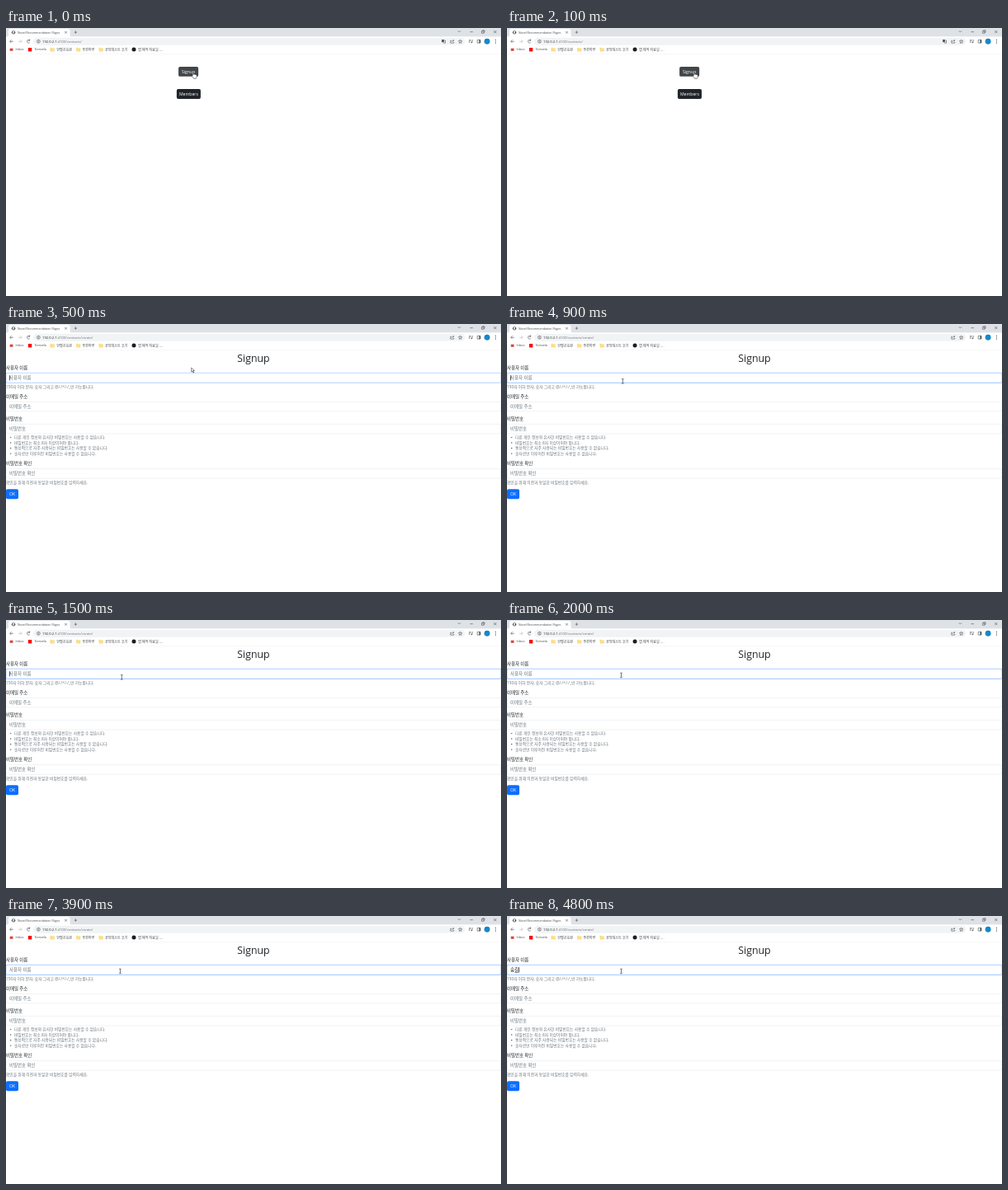
Animation of 600x325 px, one loop 5000 ms. Source, as an HTML page:

```html
<!DOCTYPE html>
<html lang="ko">
<head>
<meta charset="utf-8">
<title>Signup</title>
<style>
  html, body { margin: 0; width: 100%; height: 100%; overflow: hidden; background: #fff; }
  svg { display: block; width: 100vw; height: 100vh; }
  text { font-family: "Open Sans", "Noto Sans CJK KR", "Noto Sans CJK", sans-serif; fill: #212529; white-space: pre; }
  .line { fill: none; stroke: #505357; stroke-width: 2; }
  .faded { stroke: #b4b7ba; }
</style>
</head>
<body>
<svg id="stage" viewBox="0 0 1920 1040"></svg>
<script>
const LOOP = 5000;
const INK = '#212529', MUTED = '#6c757d', BORDER = '#ced4da';

// y is the vertical middle of the line
const text = (x, y, size, content, fill = INK, extra = '') =>
  `<text x="${x}" y="${y + size * 0.36}" font-size="${size}" style="fill:${fill}" ${extra}>${content}</text>`;
const rect = (x, y, w, h, fill, rx = 0, extra = '') =>
  `<rect x="${x}" y="${y}" width="${w}" height="${h}" rx="${rx}" fill="${fill}" ${extra}/>`;
const circle = (x, y, r, fill) => `<circle cx="${x}" cy="${y}" r="${r}" fill="${fill}"/>`;
const line = (d, cls = '') => `<path class="line ${cls}" d="${d}"/>`;
const centred = 'text-anchor="middle"';

const label = (y, content) => text(0, y, 17.4, content);
const help = (y, content) => text(0, y, 15.2, content, MUTED);
const bullet = (y, content) => circle(18, y, 2.6, MUTED) + text(32, y, 15.2, content, MUTED);
const button = (x, y, w, content, fill) =>
  rect(x, y, w, 38, fill, 6) + text(x + w / 2, y + 19, 16.5, content, '#fff', centred);
const input = (y, hint, id = '') =>
  rect(0.5, y + 0.5, 1919, 37, '#fff', 6, `stroke="${BORDER}" ${id && `id="${id}"`}`) +
  text(13, y + 19, 17.4, hint, MUTED, id && `id="${id}Hint"`);

const folder = x =>
  `<path d="M${x - 7} 77h5l2 2h8v11h-15z" fill="#ffe08a" stroke="#e9c55c"/>`;
const bookmark = (x, content, size = 13.2) => text(x, 83.5, size, content, '#45484c');

function browser() {
  return rect(0, 0, 1920, 34, '#dee1e6') +
    `<path d="M2 34q8 0 8-8V11q0-8 8-8h222q8 0 8 8v15q0 8 8 8z" fill="#fff"/>` +
    circle(29, 17, 7, '#505357') +
    `<path d="M25 14l5-2 3 4-4 2 2 3-3 2z" fill="#fff"/>` +
    text(45, 17, 11.6, 'Novel Recommendation Pages', '#45484c') +
    line('M228 13l8 8m0-8l-8 8') + line('M270 11v11m-5.5-5.5h11') +
    line('M1753 11l5 5 5-5M1800 15h11M1845 12h8v8h-8zM1848 12v-3h8v8h-3M1892 10l10 10m0-10l-10 10') +

    rect(0, 34, 1920, 68, '#fff') +
    rect(106, 38, 1674, 28, '#f1f3f4', 14) +
    line('M28 52H15m6-6l-6 6 6 6') +
    line('M48 52h13m-6-6l6 6-6 6', 'faded') +
    line('M92 48a6 6 0 1 0 0 8M92 43v6h-6') +
    `<circle class="line" cx="126" cy="52" r="6"/>` + line('M126 51v5M126 47.5v2') +
    `<text x="141" y="57" font-size="13.4" style="fill:${MUTED}"><tspan fill="${INK}">192.0.2.1</tspan>:4100/contacts/<tspan id="route">create/</tspan></text>` +
    `<g id="translate">${rect(1690, 45, 9, 10, '#505357', 1)}${line('M1696 58h8v-10h-4')}</g>` +
    line('M1728 49h-4v9h13v-4M1730 54q0-6 7-6m-3-3l3 3-3 3') +
    line('M1762 45l2 5 5 .5-4 3.5 1 5-4-3-4 3 1-5-4-3.5 5-.5z') +
    line('M1795 47h9m-9 4h7m-7 4h5M1808 56v-9h3') + circle(1806, 56, 2.5, '#505357') +
    line('M1828 46h12v12h-12z') + rect(1835, 46, 5, 12, '#505357') +
    circle(1866, 52, 11, '#1687c8') +
    [46, 52, 58].map(y => circle(1899, y, 1.8, '#505357')).join('') +

    rect(15, 79, 12, 10, '#d9483b') + bookmark(37, 'Inbox', 12) +
    rect(86, 77, 14, 14, '#f00') + bookmark(110, 'Tomvela', 12) +
    folder(179) + bookmark(196, '한별교육원') +
    folder(280) + bookmark(296, '푸른마루') +
    folder(368) + bookmark(384, '코딩테스트 후기') +
    circle(496, 83.5, 8, '#1b1f23') + bookmark(512, '앱 제작 자료실 -...') +
    rect(0, 101, 1920, 1, '#e3e5e8');
}

const home = () =>
  button(669, 150, 77, 'Signup', '#424649') + button(662, 237, 93, 'Members', INK);

function form() {
  return text(960, 132, 39.5, 'Signup', INK, centred) +
    label(170.5, '사용자 이름') +
    rect(-2, 188, 1924, 42, '#0d6efd', 8, 'id="ring"') +
    input(190, '사용자 이름', 'user') +
    text(13, 209, 17.4, '', INK, 'id="typed"') +
    rect(0, 218, 15, 1.5, INK, 0, 'id="underline"') +
    rect(0, 199, 2, 20, '#000', 0, 'id="caret"') +
    help(243, '150자 이하 문자, 숫자 그리고 @/./+/-/_만 가능합니다.') +
    label(281.5, '이메일 주소') + input(301, '이메일 주소') +
    label(368.5, '비밀번호') + input(388, '비밀번호') +
    bullet(440, '다른 개인 정보와 유사한 비밀번호는 사용할 수 없습니다.') +
    bullet(461, '비밀번호는 최소 8자 이상이어야 합니다.') +
    bullet(482, '통상적으로 자주 사용되는 비밀번호는 사용할 수 없습니다.') +
    bullet(503, '숫자로만 이루어진 비밀번호는 사용할 수 없습니다.') +
    label(542, '비밀번호 확인') + input(561.5, '비밀번호 확인') +
    help(614, '확인을 위해 이전과 동일한 비밀번호를 입력하세요.') +
    button(0, 641, 48, 'OK', '#0d6efd');
}

// pointer shapes, each with its hot spot at 0,0
const pointers = `
  <path id="hand" fill="#fff" stroke="#000" stroke-width="1.5"
    d="M-2 1q2-3 4 0v8q2-2 4 0 2-1 4 1 3-1 4 2v6q0 4-3 7h-9l-7-10q0-3 3-2z"/>
  <path id="arrow" fill="#fff" stroke="#000" stroke-width="1.5" d="M0 0v16l4-4 3 7 3-1-3-7h5z"/>
  <path id="beam" fill="none" stroke="#222" stroke-width="2" d="M-4-9h3l1 1 1-1h3M0-8v16M-4 9h3l1-1 1 1h3"/>`;

const stage = document.getElementById('stage');
stage.innerHTML = browser() +
  `<g id="home">${home()}</g><g id="form">${form()}</g>` + pointers;

const part = {};
stage.querySelectorAll('[id]').forEach(el => part[el.id] = el);
const show = (el, on) => el.style.display = on ? '' : 'none';

// [start ms, value...]
const pointerSteps = [
  [0, 'hand', 726, 171], [400, 'arrow', 719, 170], [800, 'arrow', 560, 200],
  [900, 'beam', 449, 222], [1900, 'beam', 446, 218], [2000, 'beam', 443, 214]
];
const ringSteps = [[0, 0], [500, 0.65], [600, 1]];
const caretSteps = [
  [0, false], [400, true], [1000, false], [1500, true], [2000, false],
  [2500, true], [3100, false], [3200, true], [3900, false], [4200, true]
];
const typedSteps = [
  [0, ''], [3200, 'ㅅ'], [3400, '수'], [3700, 'ㅅ'], [3900, ''],
  [4200, 'ㅅ'], [4300, '수'], [4400, '숲'], [4600, '숲ㄱ'], [4800, '숲길']
];
const at = (steps, t) => steps.findLast(step => step[0] <= t).slice(1);

function draw(t) {
  const onForm = t >= 400;
  show(part.home, !onForm);
  show(part.translate, !onForm);
  show(part.form, onForm);
  show(part.route, onForm);

  const [shape, x, y] = at(pointerSteps, t);
  for (const name of ['hand', 'arrow', 'beam']) show(part[name], name === shape);
  part[shape].setAttribute('transform', `translate(${x} ${y})`);

  const [focus] = at(ringSteps, t);
  part.ring.setAttribute('opacity', focus * 0.3);
  part.user.setAttribute('stroke', focus ? '#86b7fe' : BORDER);

  const [typed] = at(typedSteps, t);
  part.typed.textContent = typed;
  show(part.userHint, !typed);
  const end = 13 + (typed && onForm ? part.typed.getComputedTextLength() : 0);
  part.caret.setAttribute('x', end);
  part.underline.setAttribute('x', end - 15);
  show(part.underline, typed);
  show(part.caret, at(caretSteps, t)[0]);
}

function tick() {
  draw(performance.now() % LOOP);
  requestAnimationFrame(tick);
}
tick();
</script>
</body>
</html>
```
